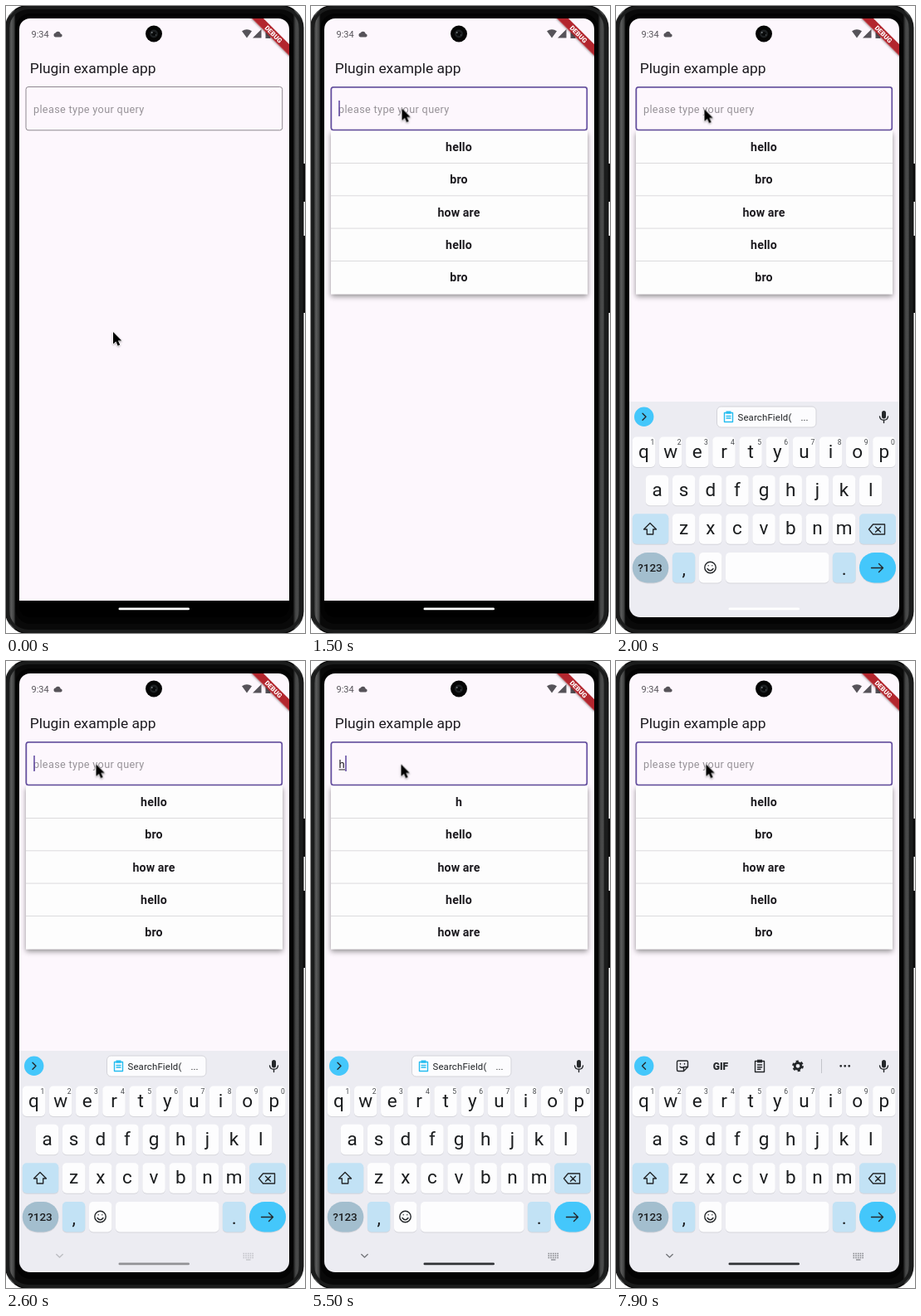
Animation, 360 px wide and 756 px high, one loop 8 s. Source, as an HTML page:

```html
<!DOCTYPE html>
<html lang="en">
<head>
<meta charset="utf-8">
<title>Search field demo</title>
<style>
html, body { margin: 0; width: 100%; height: 100%; overflow: hidden; background: #fff; }
svg { display: block; width: 100vw; height: 100vh; font-family: Roboto, sans-serif; }
.mid { text-anchor: middle; }
.line { fill: none; stroke: #24272a; stroke-width: 1.4; stroke-linecap: round; stroke-linejoin: round; }
.option { font-size: 14.2px; font-weight: 700; letter-spacing: .12px; fill: #1d1b20; }
.key { font-size: 22.5px; fill: #1b1d1f; }
.hint { font-size: 8.5px; fill: #45484c; }

.anim { animation: 8s step-end infinite; }
#pointer { animation-name: point; }
#keyboard { animation-name: rise; }
#focus, #dropdown { animation-name: open; }
#caret { animation-name: blink; }
.typed { animation-name: typed; }
.empty { animation-name: empty; }
.chip { animation-name: chip; }
.tools { animation-name: tools; }
#nav { animation: fade 8s linear infinite; }
#home { animation: darken 8s linear infinite; }

@keyframes point {
  0% { transform: translate(129px, 393px); }
  1.25% { transform: translate(128px, 384px); }
  2.5% { transform: translate(126px, 357px); }
  3.75% { transform: translate(124px, 323px); }
  5% { transform: translate(121px, 283px); }
  6.25% { transform: translate(117px, 235px); }
  7.5% { transform: translate(114px, 195px); }
  8.75% { transform: translate(112px, 161px); }
  10% { transform: translate(110px, 134px); }
  11.25% { transform: translate(109.5px, 123.5px); }
  22.5% { transform: translate(106.5px, 124.5px); }
  27.5%, 100% { transform: translate(108.5px, 124.5px); }
}
@keyframes rise {
  0% { transform: translateY(290px); }
  22.5% { transform: translateY(190px); }
  23.75% { transform: translateY(38.5px); }
  25% { transform: translateY(7px); }
  26.25%, 100% { transform: none; }
}
@keyframes open { 0% { opacity: 0; } 18.75%, 100% { opacity: 1; } }
@keyframes blink {
  0% { opacity: 0; transform: none; }
  18.75% { opacity: 1; } 23.75% { opacity: 0; }
  30% { opacity: 1; } 36.25% { opacity: 0; }
  42.5% { opacity: 1; } 48.75% { opacity: 0; }
  55% { opacity: 1; } 61.25% { opacity: 0; transform: none; }
  67.5% { opacity: 1; transform: translateX(8px); }
  73.75% { opacity: 0; transform: translateX(8px); }
  80% { opacity: 1; transform: translateX(8px); }
  86.25% { opacity: 1; transform: none; }
  92.5% { opacity: 1; } 98.75%, 100% { opacity: 0; transform: none; }
}
@keyframes typed { 0% { opacity: 0; } 67.5% { opacity: 1; } 86.25%, 100% { opacity: 0; } }
@keyframes empty { 0% { opacity: 1; } 67.5% { opacity: 0; } 86.25%, 100% { opacity: 1; } }
@keyframes chip { 0% { opacity: 1; } 86.25%, 100% { opacity: 0; } }
@keyframes tools { 0% { opacity: 0; } 86.25%, 100% { opacity: 1; } }
@keyframes fade { 0%, 30% { opacity: 0; } 32.5% { opacity: .4; } 35%, 100% { opacity: 1; } }
@keyframes darken { 0%, 30% { fill: #fff; } 32.5% { fill: #929296; } 35%, 100% { fill: #303236; } }
</style>
</head>
<body>
<svg viewBox="0 0 360 756" preserveAspectRatio="none">
  <defs>
    <linearGradient id="rim">
      <stop offset="0" stop-color="#111"/><stop offset=".012" stop-color="#262727"/>
      <stop offset=".02" stop-color="#5b5c5c"/><stop offset=".029" stop-color="#414242"/>
      <stop offset=".035" stop-color="#090909"/><stop offset=".964" stop-color="#090909"/>
      <stop offset=".972" stop-color="#414242"/><stop offset=".979" stop-color="#4d4e4e"/>
      <stop offset=".988" stop-color="#242525"/><stop offset="1" stop-color="#111"/>
    </linearGradient>
    <clipPath id="screen"><rect x="16" y="15" width="325" height="722" rx="13"/></clipPath>
    <filter id="shadow" x="-10%" y="-10%" width="120%" height="125%">
      <feDropShadow dx="0" dy="3" stdDeviation="3.2" flood-color="#000" flood-opacity=".42"/>
    </filter>
    <filter id="soft" x="-30%" y="-30%" width="170%" height="170%">
      <feDropShadow dx="0" dy="1" stdDeviation=".8" flood-color="#000" flood-opacity=".35"/>
    </filter>
  </defs>

  <g id="phone">
    <path d="M357 190H360V236H357ZM357 277H360V370H357Z" fill="#080808"/>
    <rect x="-1" y="-1" width="359.5" height="758" rx="27" fill="url(#rim)"/>
    <rect x="2" y="2" width="353" height="752" rx="25" fill="none" stroke="#1b1c1c" stroke-width="4"/>
    <rect x="11.5" y="9" width="334" height="736" rx="18" fill="#030303"/>
  </g>

  <g clip-path="url(#screen)">
    <rect x="16" y="15" width="325" height="702" fill="#fdf7fd"/>
    <g fill="#565359">
      <text x="30.5" y="38" font-size="11">9:34</text>
      <path d="M59.5 37.5a2.6 2.6 0 0 1 0-5.1a3.5 3.5 0 0 1 6.3 1a2.1 2.1 0 0 1 .3 4.1Z"/>
      <path d="M284 30.2Q290 26.2 296 30.2L290 38.5Z"/>
      <path d="M297 38.5L307.5 28V38.5ZM312.5 29.5H314V28H317V29.5H318.5V39H312.5Z"/>
    </g>
    <text x="28.7" y="81" font-size="17.4" fill="#1d1b20">Plugin example app</text>

    <rect x="24" y="97.5" width="308.7" height="52.3" rx="3" fill="none" stroke="#827c84" stroke-width=".9"/>
    <rect id="focus" class="anim" x="24.4" y="98" width="307.8" height="51.6" rx="2.5" fill="none" stroke="#6650a4" stroke-width="1.6"/>
    <text class="anim empty" x="33" y="129" font-size="12.65" letter-spacing=".35" fill="#979298">please type your query</text>
    <g class="anim typed" fill="#1d1b20">
      <text x="33.5" y="129" font-size="13">h</text>
      <rect x="33.5" y="130.5" width="7.5" height="1"/>
    </g>
    <rect id="caret" class="anim" x="33.2" y="114" width="1.6" height="19" fill="#6650a4"/>

    <g id="dropdown" class="anim">
      <rect x="24" y="150.5" width="309" height="196.8" fill="#fdfdfd" filter="url(#shadow)"/>
      <path d="M24 189.5H333M24 228.8H333M24 268.1H333M24 307.5H333" stroke="#dcdbdd" stroke-width="1"/>
      <g id="all" class="anim empty"></g>
      <g id="matches" class="anim typed"></g>
    </g>

    <rect x="16" y="717" width="325" height="20" fill="#000"/>
    <g id="keyboard" class="anim">
      <rect x="16" y="470" width="325" height="320" fill="#ececf2"/>
      <circle cx="33.7" cy="488.3" r="11.7" fill="#44c7fb"/>
      <path class="line anim chip" d="M32 484.3L36 488.3L32 492.3"/>
      <path class="line anim tools" d="M35.5 484.3L31.5 488.3L35.5 492.3"/>

      <g class="anim chip">
        <rect x="121.5" y="476" width="119.5" height="25" rx="5" fill="#fcfcfe" stroke="#d3d3d9"/>
        <path class="line" d="M130.5 483.5H140.5V494.5H130.5ZM133 487.5H138M133 490H138" style="stroke:#26bdf0"/>
        <rect x="132.5" y="481.5" width="6" height="3.2" fill="#26bdf0"/>
        <text x="146.5" y="492.5" font-size="11.4" letter-spacing=".15" fill="#202326">SearchField(</text>
        <text x="222.5" y="492.5" font-size="11.4" fill="#202326">...</text>
      </g>

      <g class="anim tools">
        <path class="line" d="M75 482H85Q86.500 482 86.500 483.500V489.500L81.500 494.500H75Q73.500 494.500 73.500 493V483.500Q73.500 482 75 482ZM81.500 494V489.500H86M77.500 485.500V486M82.500 485.500V486M77 489Q78.500 491 80.500 490"/>
        <text class="mid" x="126" y="492.6" font-size="12" font-weight="900" fill="#24272a">GIF</text>
        <path class="line" d="M167.500 482.500H178.500V495.500H167.500ZM170.500 487H175.500M170.500 489.700H175.500M170.500 492.300H174"/>
        <rect x="170" y="480.700" width="6" height="3.600" fill="#24272a"/>
        <circle cx="219" cy="488.300" r="5.600" fill="none" stroke="#24272a" stroke-width="2.600" stroke-dasharray="3 2.860"/>
        <circle cx="219" cy="488.300" r="3.800" fill="none" stroke="#24272a" stroke-width="2.800"/>
        <path d="M247.500 480V497" stroke="#c3c4ca"/>
        <path d="M270.700 488.300h.01M275.700 488.300h.01M280.700 488.300h.01" stroke="#24272a" stroke-width="2.800" stroke-linecap="round"/>
      </g>

      <rect x="320" y="481" width="5" height="9.500" rx="2.500" fill="#24272a"/>
      <path class="line" d="M317.500 488Q318 492.300 322.500 492.300T327.500 488M322.500 492.500V495.500"/>

      <g id="keys"></g>

      <path class="line" d="M41 616.500L48.500 624H44.700V630H37.300V624H33.500Z"/>
      <path class="line" d="M309.500 618H323.500V630H309.500L304.500 624ZM312.500 621.200L318.500 627.200M318.500 621.200L312.500 627.200"/>
      <circle class="line" cx="113.500" cy="670" r="6.700"/>
      <path class="line" d="M110 671.500Q113.500 676 117 671.500M111.200 667.800h.01M115.800 667.800h.01"/>
      <path class="line" d="M307.500 670.500H321.500M316.500 665.500L321.500 670.500L316.500 675.500"/>
      <g id="nav">
        <path class="line" d="M60.800 715.500L64.500 719L68.200 715.500" style="stroke:#75777c"/>
        <path d="M285.500 714.500H298M285.500 717H298M285.500 719.500H298" stroke="#85878c" stroke-width="1.600" stroke-dasharray="1.600 1.100"/>
        <path d="M289 722H294.500" stroke="#85878c" stroke-width="1.300"/>
      </g>
    </g>
    <rect id="home" x="135.500" y="725.500" width="85.500" height="2.800" rx="1.400"/>

    <g transform="translate(341 15) rotate(45)">
      <rect x="-40" y="22" width="80" height="9.700" fill="#b3272d" filter="url(#soft)"/>
      <text class="mid" y="29.700" font-size="8" font-weight="900" fill="#fff">DEBUG</text>
    </g>
  </g>

  <circle cx="178" cy="33.500" r="10" fill="#050505"/>
  <circle cx="178" cy="33.500" r="5" fill="#1d2022"/>
  <circle cx="178" cy="33.500" r="2.600" fill="#08090a"/>
  <circle cx="175.700" cy="32" r="1" fill="#70777a"/>
  <circle cx="180.500" cy="35" r=".7" fill="#555b5e"/>

  <g id="pointer" class="anim">
    <path d="M0 0V14.500L3.400 11.400L5.700 16.700L8.200 15.600L5.900 10.500H10.300Z" fill="#000" stroke="#fff" stroke-width="1" stroke-linejoin="round" paint-order="stroke" filter="url(#soft)"/>
  </g>
</svg>
<script>
const byId = id => document.getElementById(id);
const label = (x, y, text, cls) => `<text class="mid ${cls}" x="${x}" y="${y}">${text}</text>`;
const cap = (x, y, width, fill = '#fdfdfe', radius = 5) =>
  `<rect x="${x}" y="${y + 1}" width="${width}" height="36.5" rx="${radius}" fill="#d5d5db"/>` +
  `<rect x="${x}" y="${y}" width="${width}" height="36.5" rx="${radius}" fill="${fill}"/>`;

const options = names => names.map((name, i) => label(178, 174.7 + i * 39.4, name, 'option')).join('');
byId('all').innerHTML = options(['hello', 'bro', 'how are', 'hello', 'bro']);
byId('matches').innerHTML = options(['h', 'hello', 'how are', 'hello', 'how are']);

const pitch = 32.15, blue = '#c2e2f5';
const letterRow = (letters, firstCenter, top, numbered) => [...letters].map((letter, i) => {
  const x = firstCenter + i * pitch;
  const digit = numbered ? label(x + 10.5, top + 9.5, (i + 1) % 10, 'hint') : '';
  return cap(x - 13.7, top, 27.4) + label(x, top + 25.2, letter, 'key') + digit;
}).join('');

byId('keys').innerHTML =
  letterRow('qwertyuiop', 33.5, 512.5, true) +
  letterRow('asdfghjkl', 49.5, 558.8) +
  letterRow('zxcvbnm', 81.6, 605.2) +
  cap(19.8, 605.2, 43.5, blue) + cap(293, 605.2, 44, blue) +
  cap(19.8, 652, 43.5, '#a3bece', 18.2) + cap(67.9, 652, 27.4, blue) +
  cap(100, 652, 27.4) + cap(132, 652, 124.5) +
  cap(260.8, 652, 27.8, blue) + cap(293, 652, 44, '#44c7fb', 18.2) +
  `<text class="mid" x="41" y="675.3" font-size="13.5" font-weight="500" fill="#1b1d1f">?123</text>` +
  label(81.6, 679, ',', 'key') + label(274.7, 679, '.', 'key');
</script>
</body>
</html>
```
